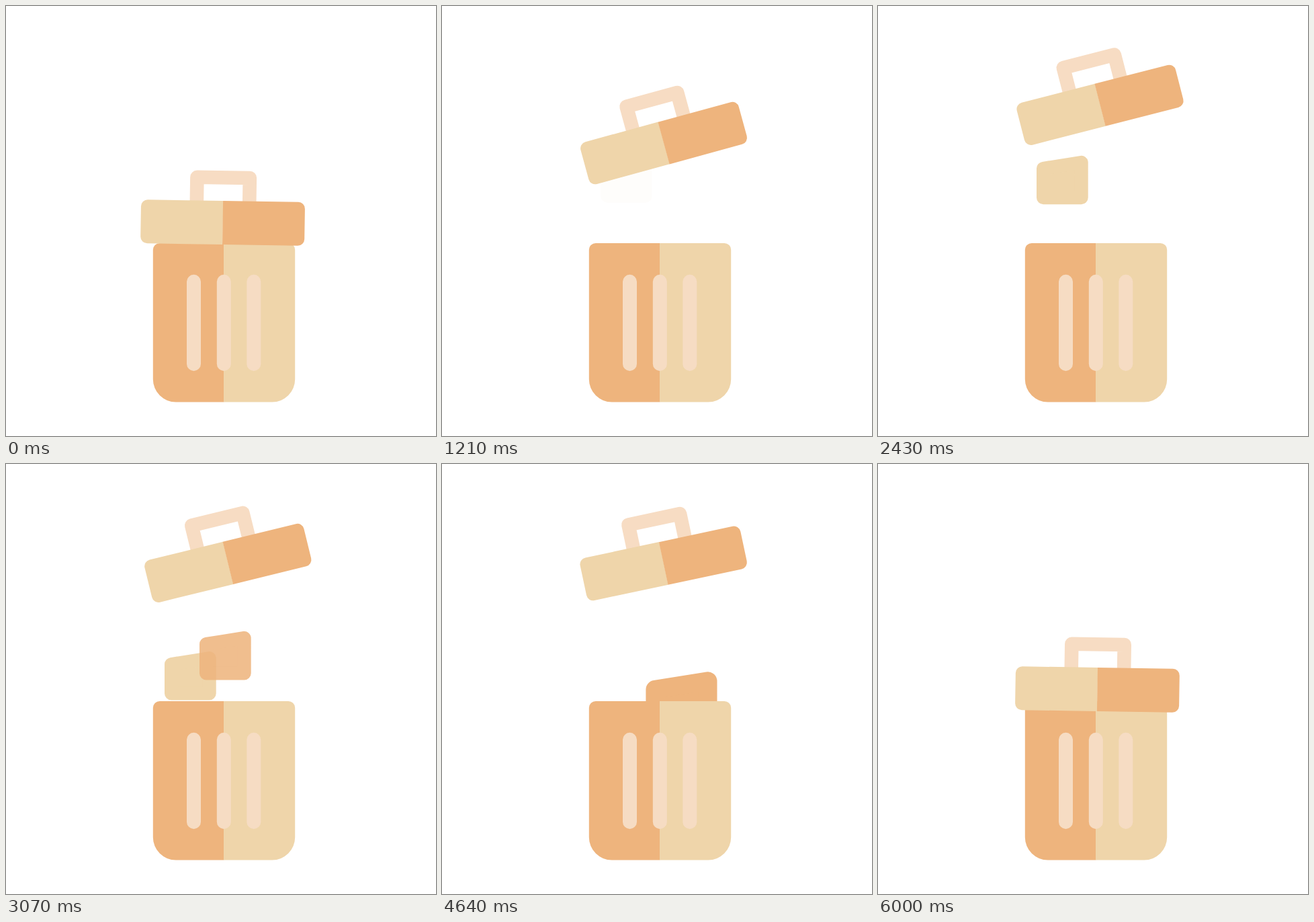
An HTML page that plays this animation: 640x640 px, repeating every 7.14 s.

```html
<!DOCTYPE html>
<html lang="en">
<head>
<meta charset="utf-8">
<title>Trash can</title>
<style>
  html, body { margin: 0; width: 100%; height: 100%; overflow: hidden; background: #fff; }
  svg { display: block; width: 100%; height: 100%; }
  .orange { fill: #eeb47d; stroke: #eeb47d; }
  .sand { fill: #efd5aa; stroke: #efd5aa; }
  .flat { stroke: none; }
  .sheet { stroke-width: 20; stroke-linejoin: round; }
</style>
</head>
<body>
<svg viewBox="0 0 640 640">
  <defs>
    <path id="sheet" d="M10 19 L66.7 10 V62.5 H10 Z"/>
  </defs>

  <g class="paper"><use class="sheet sand" href="#sheet" transform="translate(236 220.3)"/></g>
  <g class="paper"><use class="sheet orange" href="#sheet" transform="translate(288 249)"/></g>
  <g class="paper"><use class="sheet orange" href="#sheet" transform="translate(303.4 309.1) scale(1.383)"/></g>

  <path class="orange flat" d="M324.3 353 H229 a10 10 0 0 0 -10.2 10 V555.5 a34 34 0 0 0 34 34 H324.3 Z"/>
  <path class="sand flat" d="M324 353 H420 a10 10 0 0 1 10.2 10 V555.5 a34 34 0 0 1 -34 34 H324 Z"/>
  <path d="M279.5 410.3 V532.7 M324.3 410.3 V532.7 M368.8 410.3 V532.7"
        stroke="#f6dcc3" stroke-width="21" stroke-linecap="round"/>

  <g id="lid">
    <path d="M-39.2 0 V-46.1 H39.2 V0" fill="none" stroke="#f7dcc3"
          stroke-width="20.6" stroke-linejoin="round"/>
    <path class="sand flat" d="M.3 -11.5 H-112 a10 10 0 0 0 -10 10 V43.5 a10 10 0 0 0 10 10 H.3 Z"/>
    <path class="orange flat" d="M0 -11.5 H112 a10 10 0 0 1 10 10 V43.5 a10 10 0 0 1 -10 10 H0 Z"/>
  </g>
</svg>
<script>
const LOOP = 7140, FPS = 14, LAST_STEP = 84;
const FADE = 720, FALL_SPEED = 0.0875;

const lid = document.getElementById('lid');
const papers = document.querySelectorAll('.paper');

// Linear progress from 0 to 1 between two times.
const ramp = (t, from, to) => Math.max(0, Math.min(1, (t - from) / (to - from)));

function drawLid(t) {
  const lift = ramp(t, 0, 1800), drop = ramp(t, 4640, 6000);
  const x = 322.9 + 2.4 * lift + 1.5 * drop;
  const y = 301.5 - 174.5 * lift + 187.5 * drop;

  // A quick tilt, a slow settling while open, a quick tilt back.
  const settle = ramp(t, 700, 5280) ** 1.4;
  const angle = 0.9 - 16.4 * ramp(t, 0, 700) + 4.3 * settle + 12.1 * ramp(t, 5280, 6000);

  lid.setAttribute('transform', `translate(${x} ${y}) rotate(${angle})`);
}

function drawPaper(paper, i, t) {
  const appear = 1185 + 1265 * i, fall = 2400 + 1120 * i;
  const dy = Math.min(FALL_SPEED * Math.max(0, t - fall), 140);
  paper.setAttribute('transform', `translate(0 ${dy})`);
  paper.setAttribute('opacity', ramp(t, appear, appear + FADE));
}

function draw(now) {
  const step = Math.floor((now % LOOP) * FPS / 1000 + 0.06);
  const t = Math.min(step, LAST_STEP) * 1000 / FPS;
  drawLid(t);
  papers.forEach((paper, i) => drawPaper(paper, i, t));
}

const start = performance.now();
function tick() {
  draw(performance.now() - start);
  requestAnimationFrame(tick);
}
tick();
</script>
</body>
</html>
```
